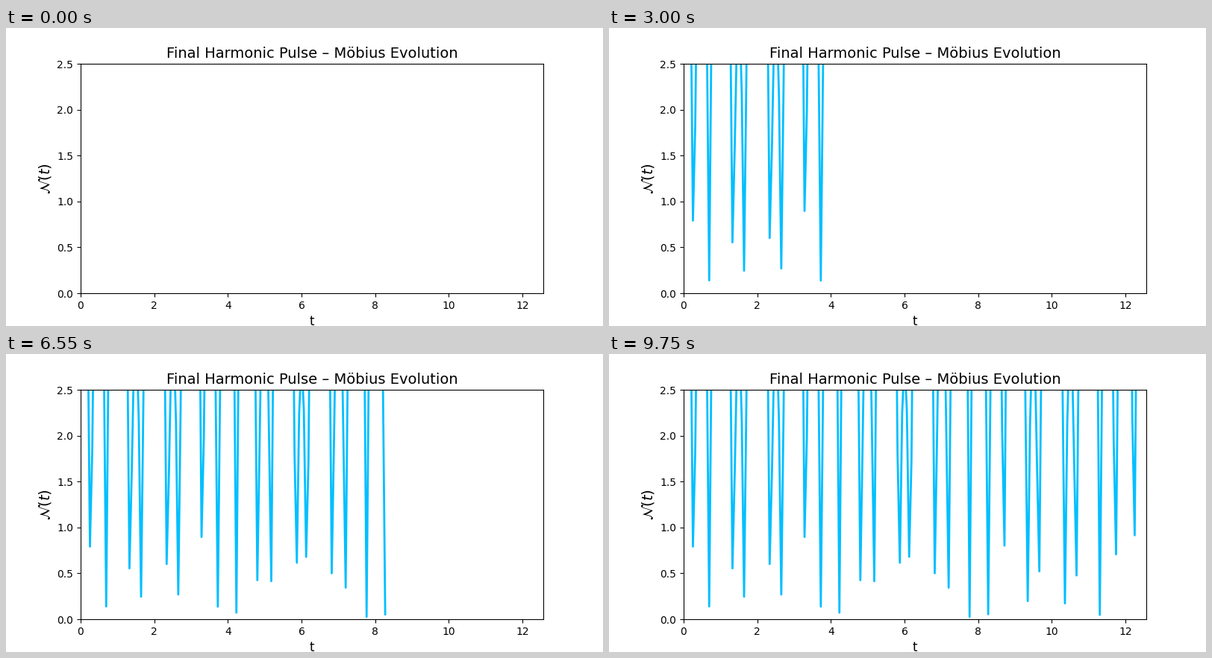
A matplotlib script that plays this animation: 800x400 px, repeating every 10000 ms.

```python
import numpy as np
import matplotlib.pyplot as plt
from matplotlib.animation import FuncAnimation

FRAMES = 200
INTERVAL_MS = 50

t = np.linspace(0, 4 * np.pi, FRAMES)
# Fast carrier with a slow drift, folded at zero
pulse = np.abs(7.4 * np.cos(2 * np.pi * t) + 4.575 * np.sin(np.pi * t / 4) + 0.01)

fig, ax = plt.subplots(figsize=(8, 4), dpi=100)
ax.set_xlim(0, 4 * np.pi)
ax.set_ylim(0, 2.5)
ax.set_title("Final Harmonic Pulse – Möbius Evolution", fontsize=14)
ax.set_xlabel("t", fontsize=12)
ax.set_ylabel(r"$\mathcal{N}(t)$", fontsize=14)
line, = ax.plot([], [], color="deepskyblue", lw=2)


def init():
    line.set_data([], [])
    return line,


def update(frame):
    line.set_data(t[:frame + 1], pulse[:frame + 1])
    return line,


anim = FuncAnimation(fig, update, frames=FRAMES, init_func=init,
                     interval=INTERVAL_MS, repeat=True, repeat_delay=0)
plt.show()
```
